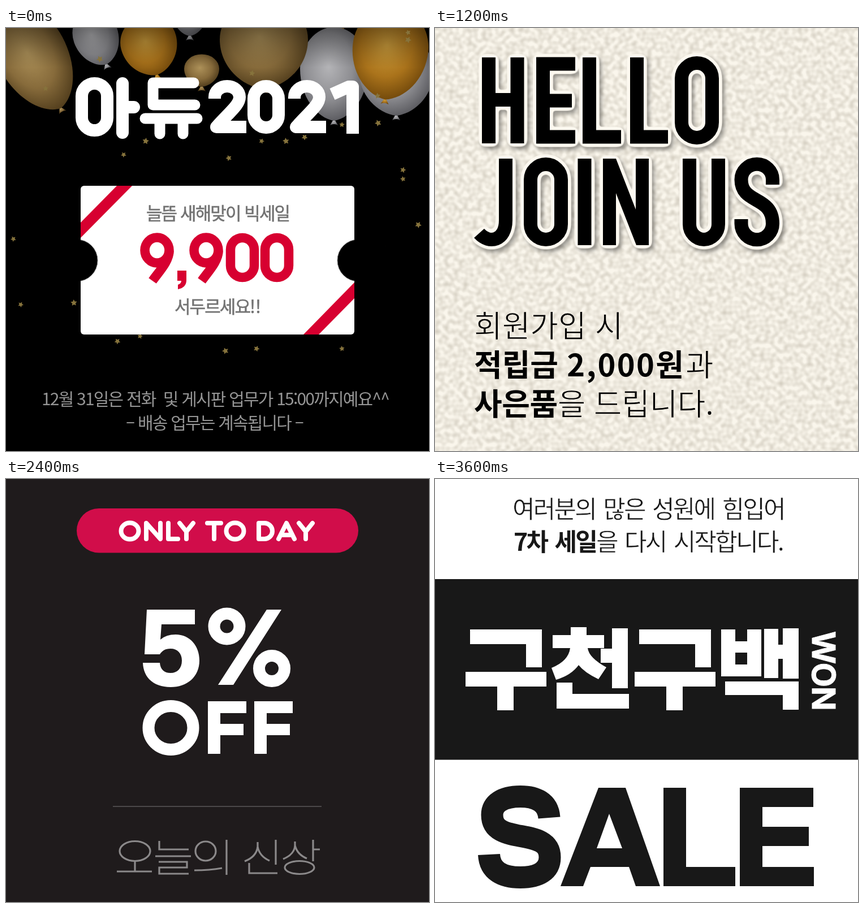
An HTML page that plays this animation: 748x748 px, repeating every 4800 ms.

```html
<!DOCTYPE html>
<html lang="ko">
<head>
<meta charset="utf-8">
<title>Sale banner</title>
<style>
  html, body { margin: 0; width: 100%; height: 100%; overflow: hidden; background: #000; }
  svg { display: block; width: 100vw; height: 100vh; }
  text { font-family: "Noto Sans CJK KR", "Noto Sans KR", sans-serif; white-space: pre; }
  .line { fill: none; }
  .note { font-size: 31px; font-weight: 500; fill: #737373; stroke: #737373; stroke-width: .6px; letter-spacing: -1.9px; }
  .info { font-size: 30px; fill: #959595; letter-spacing: -1.8px; }
  /* a paper-coloured edge slims the regular weight */
  .join { font-size: 54px; font-weight: 300; stroke: #f3eee3; stroke-width: 1.1px; }
  .head { font-size: 43px; font-weight: 300; fill: #181818; stroke: #fff; stroke-width: .6px; letter-spacing: -2.8px; word-spacing: 4px; }
  .bold { font-weight: 700; stroke: none; }
</style>
</head>
<body>
<svg viewBox="0 0 748 748">
  <defs>
    <radialGradient id="tan" cx=".45" cy=".42" r=".62">
      <stop offset="0" stop-color="#ad9159"/><stop offset=".55" stop-color="#876b3b"/><stop offset="1" stop-color="#4a3718"/>
    </radialGradient>
    <radialGradient id="gold" cx=".45" cy=".42" r=".62">
      <stop offset="0" stop-color="#cb9c3c"/><stop offset=".55" stop-color="#aa731b"/><stop offset="1" stop-color="#6c4409"/>
    </radialGradient>
    <radialGradient id="silver" cx=".42" cy=".42" r=".65">
      <stop offset="0" stop-color="#b4b4b7"/><stop offset=".55" stop-color="#8d8d91"/><stop offset="1" stop-color="#505055"/>
    </radialGradient>
    <linearGradient id="dusk" x2="0" y2="1">
      <stop offset="0" stop-opacity=".35"/><stop offset="1" stop-opacity="0"/>
    </linearGradient>
    <filter id="paper" x="0" y="0" width="100%" height="100%" color-interpolation-filters="sRGB">
      <feTurbulence type="fractalNoise" baseFrequency=".12" numOctaves="1" seed="7"/>
      <feColorMatrix values="0 0 0 0 .79  0 0 0 0 .765  0 0 0 0 .71  1.5 0 0 0 -.5"/>
    </filter>
    <filter id="sticker" filterUnits="userSpaceOnUse" x="40" y="20" width="620" height="410" color-interpolation-filters="sRGB">
      <feGaussianBlur in="SourceAlpha" stdDeviation="4.2"/>
      <feComponentTransfer result="fat"><feFuncA type="linear" slope="14" intercept="-.7"/></feComponentTransfer>
      <feFlood flood-color="#fdf9f0"/>
      <feComposite in2="fat" operator="in" result="rim"/>
      <feGaussianBlur in="fat" stdDeviation="3.5"/>
      <feOffset dx="4" dy="5"/>
      <feComponentTransfer result="shade"><feFuncA type="linear" slope=".4"/></feComponentTransfer>
      <feMerge><feMergeNode in="shade"/><feMergeNode in="rim"/><feMergeNode in="SourceGraphic"/></feMerge>
    </filter>
    <path id="two" d="M369 125V122A22 19 0 0 1 413 122C413 136 396 148 372 175H425"/>
    <g id="nine">
      <ellipse cx="267" cy="393" rx="21.500" ry="22.500"/>
      <path d="M288.500 394C288.500 412 272 429 259 447"/>
    </g>
    <path id="gu" d="M62 266H189V333H161V292H62ZM54 341H197V367H139V409H110V367H54Z"/>
    <path id="eff" d="M357 393H425V414H379V433H420V453H379V486H357Z"/>
  </defs>

  <!-- Year-end coupon -->
  <g class="scene">
    <rect width="748" height="748"/>
    <g id="balloons"></g>
    <rect width="748" height="70" fill="url(#dusk)"/>
    <g id="stars" fill="#86733c"></g>
    <g class="line" stroke="#fff" stroke-width="22" stroke-linejoin="round" role="img" aria-label="아듀2021">
      <rect x="134" y="98" width="45" height="83" rx="22.5"/>
      <path stroke-linecap="round" d="M206 98V185M206 140H226"/>
      <path stroke-width="19" stroke-linecap="round" d="M332 97H260V136H334M246 160H338M272 162V187M313 162V187"/>
      <use href="#two"/>
      <rect x="438" y="103" width="44" height="73" rx="22"/>
      <use href="#two" x="141"/>
      <path d="M577 117L606 104H613V187"/>
    </g>
    <rect x="132" y="279" width="484" height="263" rx="6" fill="#fff"/>
    <path fill="#d70030" d="M196 279H223L132 371V344ZM616 450V478L553 542H526Z"/>
    <g stroke="#777"><circle cx="125" cy="411" r="37"/><circle cx="623" cy="411" r="37"/></g>
    <path d="M80 360H131.500V460H80ZM616.500 360H670V460H616.500Z"/>
    <text class="note" x="248" y="339">늘뜸 새해맞이 빅세일</text>
    <g class="line" stroke="#d70030" stroke-width="16.500" role="img" aria-label="9,900">
      <use href="#nine"/>
      <path fill="#d70030" stroke="none" d="M303 429H319V446Q319 459 304 462V454Q310 452 310 447H303Z"/>
      <use href="#nine" x="87"/>
      <rect x="397" y="371" width="42" height="70" rx="21"/>
      <rect x="458" y="371" width="42" height="70" rx="21"/>
    </g>
    <text class="note" x="298" y="504">서두르세요<tspan letter-spacing="0">!!</tspan></text>
    <text class="info" x="63" y="667">12월 31일은 전화  및 게시판 업무가 15:00까지예요^^</text>
    <text class="info" x="212" y="709">– 배송 업무는 계속됩니다 –</text>
  </g>

  <!-- Sign-up -->
  <g class="scene">
    <rect width="748" height="748" fill="#faf6ec"/>
    <rect width="748" height="748" filter="url(#paper)"/>
    <g filter="url(#sticker)" role="img" aria-label="HELLO JOIN US">
      <g class="line" stroke="#000" stroke-width="24">
        <path d="M95 52V204M145.500 52V204M95 127H145"/>
        <path d="M248 63.500H191V192.500H248M191 128.500H242"/>
        <path d="M273 52V192.500H329M357 52V192.500H412"/>
        <rect x="436" y="62" width="54" height="132" rx="27"/>
        <path d="M125 231V340C125 376 96 383 78 363"/>
        <rect x="169" y="241" width="54" height="133" rx="27"/>
        <path d="M264.500 231V384"/>
        <path d="M450 231V347A25.500 27 0 0 0 501 347V231"/>
        <path d="M597 277V268A27.500 27 0 0 0 541.500 268C541.500 312 597 296 597 346A27.500 28 0 0 1 541.500 346V338"/>
      </g>
      <path d="M297 231H320L355 321V231H378V384H356L320 292V384H297Z"/>
    </g>
    <text class="join" x="69" y="547">회원가입 시</text>
    <text class="join" x="69" y="616"><tspan class="bold">적립금 <tspan letter-spacing="2.4">2,000</tspan>원</tspan><tspan dx="3">과</tspan></text>
    <text class="join" x="69" y="685" letter-spacing="-.4"><tspan class="bold">사은품</tspan>을 드립니다.</text>
  </g>

  <!-- One-day discount -->
  <g class="scene">
    <rect width="748" height="748" fill="#1f1b1c"/>
    <rect x="125" y="52" width="498" height="78.500" rx="39.250" fill="#d10d4a"/>
    <g class="line" stroke="#fff" stroke-width="8" stroke-linecap="round" stroke-linejoin="round" role="img" aria-label="ONLY TO DAY">
      <ellipse cx="219" cy="92" rx="15.500" ry="14.500"/>
      <path d="M248 106V78L273 106V78M287 78V106H304M307 78L319 93L331 78M319 93V106"/>
      <path d="M356 78H380M368 78V106"/>
      <ellipse cx="405" cy="92" rx="15.500" ry="14.500"/>
      <path d="M447 78H457A14 14 0 0 1 457 106H447ZM482 106L496 78L510 106M488 99H504M518 78L530 93L542 78M530 93V106"/>
    </g>
    <g fill="#fff" role="img" aria-label="5% OFF">
      <path d="M249 231H334V257H275L273 284Q283 275 300 275C325 275 342 295 342 321C342 350 320 368 291 368C262 368 243 352 242 325H272C273 337 280 343 291 343C303 343 311 335 311 321C311 308 303 300 291 300C281 300 276 304 272 310H245Z"/>
      <path d="M461 231H487L402 364H375Z"/>
      <g class="line" stroke="#fff" stroke-width="21">
        <circle cx="390.500" cy="260.500" r="22.500"/>
        <circle cx="470" cy="335" r="22.500"/>
        <ellipse cx="291.500" cy="440" rx="39.500" ry="38.500"/>
      </g>
      <use href="#eff"/><use href="#eff" x="82"/>
    </g>
    <path d="M189 579H558" stroke="#4b4849" stroke-width="2"/>
    <g class="line" stroke="#8b898a" stroke-width="3.200" role="img" aria-label="오늘의 신상">
      <ellipse cx="228" cy="658" rx="27" ry="17.500"/>
      <path d="M228 676V694M196 694H258"/>
      <path d="M271 640V655H323M264 667H327M270 677H320V687H271V698H323"/>
      <ellipse cx="353" cy="658" rx="18" ry="17"/>
      <path d="M333 692Q360 692 382 688M390 638V700"/>
      <path d="M445 642V650Q443 668 422 676M445 650Q448 667 466 675M477 638V682M430 679V697H480"/>
      <path d="M511 641V648Q510 664 490 672M511 648Q515 664 532 671M543 638V676M543 655H555"/>
      <ellipse cx="519" cy="687" rx="26" ry="11.500"/>
    </g>
  </g>

  <!-- Sale -->
  <g class="scene">
    <rect width="748" height="748" fill="#fff"/>
    <text class="head" x="137" y="69">여러분의 많은 성원에 힘입어</text>
    <text class="head" x="139" y="127"><tspan class="bold">7차 세일</tspan>을 다시 시작합니다.</text>
    <rect y="177" width="748" height="319.500" fill="#181818"/>
    <g fill="#fff" role="img" aria-label="구천구백">
      <use href="#gu"/>
      <path d="M240 262H268V276H299V299H270Q272 316 303 333L289 354Q264 342 254 329Q241 347 214 355L206 334Q236 322 239 299H208V276H240ZM313 264H341V370H313V325H293V300H313ZM215 360H243V380H343V406H215Z"/>
      <use href="#gu" x="299"/>
      <path fill-rule="evenodd" d="M506 266H531V287H552V266H577V349H506ZM531 307V328H552V307Z"/>
      <path d="M582 265H607V293H615V264H643V353H615V318H607V352H582ZM513 358H643V408H615V382H513Z"/>
    </g>
    <text transform="translate(667 269) rotate(90)" fill="#fff" stroke="#fff" style="font:700 56px Inter,sans-serif;letter-spacing:-1px">WON</text>
    <g fill="#181818" role="img" aria-label="SALE">
      <path class="line" stroke="#181818" stroke-width="39" d="M202 599C200 571 178 561.500 151 561.500C119 561.500 101 574 101 594C101 650 203 613 203 669C203 693 183 704.500 151 704.500C119 704.500 97 693 95.500 664"/>
      <path d="M289 546H337L398 720H355L343 686H275L262 720H222ZM286 653H331L308 592Z" fill-rule="evenodd"/>
      <path d="M404 546H444V686H531V720H404Z"/>
      <path d="M539 546H669V580H579V615H661V649H579V686H670V720H539Z"/>
    </g>
  </g>
</svg>
<script>
const SCENE_MS = 1200;
const scenes = [...document.querySelectorAll('.scene')];

// x, y at the widest point, half width, length below it, tilt
function balloon(tone, x, y, w, h, tilt) {
  return `<g transform="translate(${x} ${y}) rotate(${tilt})" fill="url(#${tone})">
    <path d="M0 ${h - 4}l-7 12q7 -4 14 0z"/>
    <path d="M${-w} 0A${w} ${h * .8} 0 0 1 ${w} 0C${w} ${h * .55} ${w * .5} ${h * .95} 0 ${h}C${-w * .5} ${h * .95} ${-w} ${h * .55} ${-w} 0"/></g>`;
}

function star(x, y, r, turn) {
  const points = Array.from({ length: 10 }, (_, i) => {
    const a = turn + i * Math.PI / 5, d = i % 2 ? r * .5 : r;
    return [x + d * Math.sin(a), y - d * Math.cos(a)].map(v => v.toFixed(1));
  });
  return `<polygon points="${points.join(' ')}"/>`;
}

document.getElementById('balloons').innerHTML = [
  ['silver', 325, -26, 30, 40, 0], ['silver', 158, 12, 40, 56, -20],
  ['tan', 45, 45, 62, 110, -28], ['gold', 252, 25, 50, 60, -14],
  ['tan', 346, 72, 31, 32, 0], ['gold', 583, -12, 18, 25, 0],
  ['silver', 580, 72, 60, 92, 0], ['silver', 690, 75, 66, 80, 0],
  ['tan', 456, 20, 78, 88, 0], ['gold', 680, 35, 67, 92, 6]
].map(b => balloon(...b)).join('');

const sky = [
  70, 107, 166, 55, 435, 80, 711, 8, 711, 21, 657, 120, 208, 224, 247, 200,
  394, 230, 452, 200, 495, 200, 528, 193, 594, 171, 658, 168, 702, 251, 702, 267,
  729, 348, 665, 387, 13, 373, 113, 382, 111, 448, 26, 489, 120, 486, 197, 554,
  237, 545, 388, 571, 443, 567, 594, 567
];
let dots = '';
for (let i = 0; i < sky.length; i += 2) dots += star(sky[i], sky[i + 1], 5 + i % 3 / 2, i * .37);
document.getElementById('stars').innerHTML = dots;

function draw(ms) {
  const current = Math.floor(ms / SCENE_MS) % scenes.length;
  scenes.forEach((s, i) => { s.style.display = i === current ? '' : 'none'; });
}

const start = performance.now();
function tick() {
  draw(performance.now() - start);
  requestAnimationFrame(tick);
}
tick();
</script>
</body>
</html>
```
